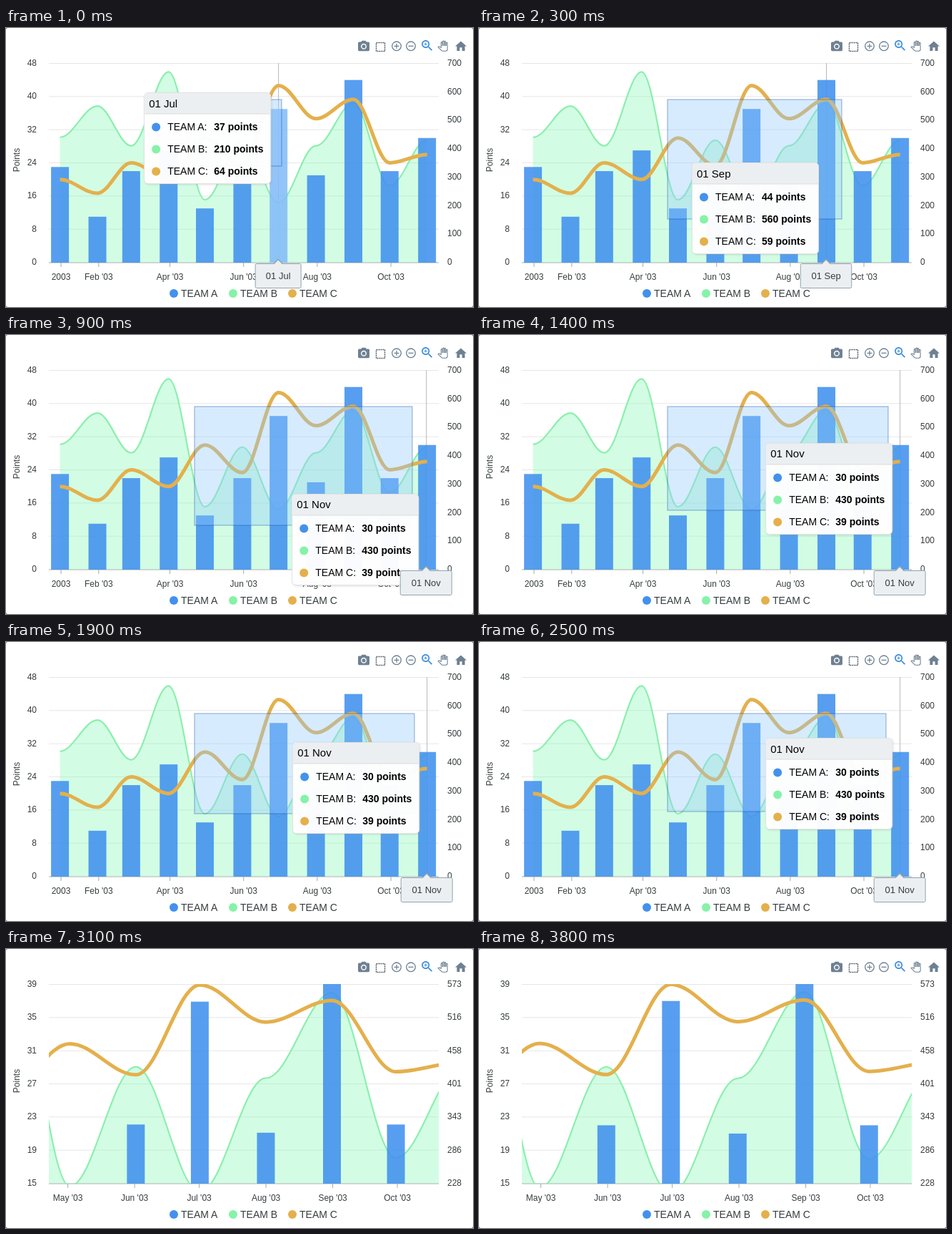
These frames come from a looping animation (654 px wide and 390 px high, 3.9 s). An HTML page:

```html
<!DOCTYPE html>
<html lang="en">
<head>
<meta charset="utf-8">
<style>
  html, body { margin: 0; width: 100%; height: 100%; overflow: hidden; background: #888; }
  svg { display: block; width: 654px; height: 390px; font: 12px "Liberation Sans", Arial, sans-serif; fill: #373d3f; }
  .mid { text-anchor: middle; }
  .end { text-anchor: end; }
  .big { font-size: 14px; }
  .tip { font-size: 14px; fill: #000; }
  .bold { font-weight: bold; }
  .icon { fill: #6e8192; }
</style>
</head>
<body>
<svg viewBox="0 0 654 390">
  <defs>
    <clipPath id="plot"><rect x="60" y="49" width="546" height="279.5"/></clipPath>
    <filter id="shadow" x="-10%" y="-10%" width="125%" height="125%">
      <feDropShadow dx="1" dy="1" stdDeviation="1.5" flood-color="#999" flood-opacity=".35"/>
    </filter>
  </defs>
  <rect width="654" height="390" rx="3" fill="#fff"/>
  <g id="grid" stroke="#e6e6e6"></g>
  <path d="M60 328H606" stroke="#a6a9aa"/>
  <g id="wide"></g>
  <g id="near"></g>
  <text class="mid" transform="translate(19 184.5) rotate(-90)">Points</text>
  <g id="legend" class="big"></g>

  <g class="icon">
    <g transform="translate(491.4 16.2) scale(.8)">
      <circle cx="12" cy="12" r="3.2"/>
      <path d="M9 2L7.17 4H4c-1.1 0-2 .9-2 2v12c0 1.1.9 2 2 2h16c1.1 0 2-.9 2-2V6c0-1.1-.9-2-2-2h-3.17L15 2H9zm3 15c-2.76 0-5-2.24-5-5s2.24-5 5-5 5 2.24 5 5-2.24 5-5 5z"/>
    </g>
    <rect x="518.5" y="20.5" width="12" height="12" fill="none" stroke="#555f69" stroke-width="1.5" stroke-dasharray="2 1"/>
    <g fill="none" stroke="#6e8192" stroke-width="1.3">
      <circle cx="547" cy="25.3" r="6.3"/><path d="M543.5 25.3h7M547 21.8v7"/>
      <circle cx="567" cy="25.3" r="6.3"/><path d="M563.5 25.3h7"/>
    </g>
    <g transform="translate(579.6 14.4) scale(.85)" fill="#3f8fdc">
      <path d="M15.5 14h-.79l-.28-.27C15.41 12.59 16 11.11 16 9.5 16 5.91 13.09 3 9.5 3S3 5.91 3 9.5 5.91 16 9.5 16c1.61 0 3.09-.59 4.23-1.57l.27.28v.79l5 4.99L20.49 19l-4.99-5zm-6 0C7.01 14 5 11.99 5 9.5S7.01 5 9.5 5 14 7.01 14 9.5 11.99 14 9.5 14z"/>
      <path d="M12 10h-2v2H9v-2H7V9h2V7h1v2h2v1z"/>
    </g>
    <path transform="translate(604.6 18) scale(.59)" fill="#fff" stroke="#6e8192" stroke-width="1.8"
      d="M23 5.5V20c0 2.2-1.8 4-4 4h-7.3c-1.08 0-2.1-.43-2.85-1.19L1 14.83s1.26-1.23 1.3-1.25c.22-.19.49-.29.79-.29.22 0 .42.06.6.16.04.01 4.31 2.46 4.31 2.46V4c0-.83.67-1.5 1.5-1.5S11 3.17 11 4v7h1V1.5c0-.83.67-1.5 1.5-1.5S15 .67 15 1.5V11h1V2.5c0-.83.67-1.5 1.5-1.5s1.5.67 1.5 1.5V11h1V5.5c0-.83.67-1.5 1.5-1.5s1.5.67 1.5 1.5z"/>
    <path transform="translate(627.4 16) scale(.8)" d="M10 20v-6h4v6h5v-8h3L12 3 2 12h3v8z"/>
  </g>

  <g clip-path="url(#plot)">
    <path id="cross" stroke="#b6b6b6"/>
    <path id="area" fill="#82f8b4" fill-opacity=".36"/>
    <path id="edge" fill="none" stroke="#8cefae" stroke-width="2.2"/>
    <g id="bars" fill-opacity=".88"></g>
    <path id="line" fill="none" stroke="#e4b04c" stroke-width="5"/>
  </g>

  <g id="overlay">
    <rect id="zone" fill="#90caf9" fill-opacity=".37" stroke="#0d47a1" stroke-opacity=".3" stroke-width="1.5"/>
    <g id="tip" class="tip">
      <rect x=".5" y=".5" width="177" height="127" rx="5" fill="#fff" fill-opacity=".96" stroke="#e3e3e3" filter="url(#shadow)"/>
      <path d="M1 30V5.5Q1 1 5.5 1H172.500Q177 1 177 5.500V30Z" fill="#eceff1"/>
      <path d="M1 30H177" stroke="#ddd"/>
      <text id="title" x="7" y="20.500" font-size="15"></text>
    </g>
    <g id="flag">
      <rect id="flagBox" y="329.500" height="34" rx="2" fill="#eceff1" stroke="#90a4ae"/>
      <path d="M-7 329.500L0 322.500L7 329.500" fill="#90a4ae"/>
      <path d="M-6 330.500L0 324.500L6 330.500" fill="#eceff1"/>
      <text id="flagText" class="mid" y="350.500" font-size="13"></text>
    </g>
  </g>
</svg>
<script>
const LOOP = 3900, ZOOM_AT = 2785, ZOOM_TIME = 350, BASE = 327.5, HEIGHT = 278;
const $ = id => document.getElementById(id);
const months = 'Jan Feb Mar Apr May Jun Jul Aug Sep Oct Nov'.split(' ');
const days = [0, 31, 59, 90, 120, 151, 181, 212, 243, 273, 304];
const teams = [
  { name: 'TEAM A', color: '#4391ec', data: [23, 11, 22, 27, 13, 22, 37, 21, 44, 22, 30], wide: [0, 48], near: [15, 39] },
  { name: 'TEAM B', color: '#86f2a8', data: [440, 550, 410, 670, 220, 430, 210, 410, 560, 270, 430], wide: [0, 700], near: [228, 573] },
  { name: 'TEAM C', color: '#e4b04c', data: [30, 25, 36, 30, 45, 35, 64, 52, 59, 36, 39], wide: [0, 72], near: [0, 64] }
];

const wideX = day => 75.6 + 1.691 * day;
const nearX = day => -277.1 + 3.016 * day;
const mix = (a, b, p) => a + (b - a) * p;
const wave = p => (1 - Math.cos(Math.PI * p)) / 2;
const clamp = p => Math.min(1, Math.max(0, p));
const text = (x, y, s, cls = '') => `<text x="${x}" y="${y}" class="${cls}">${s}</text>`;
const dot = (x, y, color) => `<circle cx="${x}" cy="${y}" r="6" fill="${color}"/>`;

// Static parts
for (let i = 0; i < 6; i++) {
  const y = 49.5 + i * HEIGHT / 6;
  $('grid').innerHTML += `<path d="M60 ${y}H606"/>`;
}
function axes(id, left, right, first, step, toX) {
  const column = (list, x, cls) =>
    list.map((v, i) => text(x, 53 + i * HEIGHT / (list.length - 1), v, cls)).join('');
  let out = column(left, 43, 'end') + column(right, 618);
  for (let i = first; i < 10; i += step) {
    const x = toX(days[i]) + 1.8;
    out += `<path d="M${x} 328v6" stroke="#a6a9aa"/>` + text(x, 352, months[i] + " '03", 'mid');
  }
  $(id).innerHTML += out;
}
axes('wide', [48, 40, 32, 24, 16, 8, 0], [700, 600, 500, 400, 300, 200, 100, 0], 1, 2, wideX);
$('wide').innerHTML += '<path d="M77 328v6" stroke="#a6a9aa"/>' + text(77, 352, 2003, 'mid');
axes('near', [39, 35, 31, 27, 23, 19, 15], [573, 516, 458, 401, 343, 286, 228], 4, 1, nearX);

teams.forEach((team, i) => {
  $('legend').innerHTML += dot(235 + 83 * i, 371, team.color) + text(245 + 83 * i, 376, team.name);
  const y = 48 + 31 * i;
  $('tip').innerHTML += dot(17, y + .5, team.color) + text(33, y + 5, team.name + ':') + text(98, y + 5, '', 'bold');
});
$('bars').innerHTML = '<rect width="25"/>'.repeat(months.length);
const bars = [...$('bars').children], values = [...document.querySelectorAll('.bold')];

// Pointer motion: time, x, y, tooltip top
const pointer = [
  [0, 386, 193, 90], [150, 462, 245, 142], [300, 508, 267, 188], [600, 538, 292, 216],
  [900, 569, 266, 222], [1400, 573, 245, 151], [1900, 572, 240, 140], [2500, 570, 237, 134]
];
// Start time and month of each hovered point
const hovers = [[-200, 6], [60, 7], [150, 8], [340, 9], [790, 10]];

function pointerAt(t) {
  let i = 0;
  while (i < pointer.length - 2 && t >= pointer[i + 1][0]) i++;
  const a = pointer[i], b = pointer[i + 1];
  const p = wave(clamp((t - a[0]) / (b[0] - a[0])));
  return a.map((v, k) => mix(v, b[k], p));
}

function pointsOf(team, p) {
  const y = (v, [lo, hi]) => BASE - (v - lo) / (hi - lo) * HEIGHT;
  return team.data.map((v, i) => [
    mix(wideX(days[i]), nearX(days[i]), p),
    mix(y(v, team.wide), y(v, team.near), p)
  ]);
}

function smooth(points) {
  return points.map(([x, y], i) => {
    if (!i) return `M${x} ${y}`;
    const [px, py] = points[i - 1], reach = (x - px) * .35;
    return `C${px + reach} ${py} ${x - reach} ${y} ${x} ${y}`;
  }).join('');
}

function set(id, attrs) {
  for (const key in attrs) $(id).setAttribute(key, attrs[key]);
}

function drawHover(t, x, y, top) {
  let n = 0;
  while (n < hovers.length - 1 && t >= hovers[n + 1][0]) n++;
  let cross = wideX(days[6]);
  for (const [start, month] of hovers.slice(0, n + 1))
    cross = mix(cross, wideX(days[month]), 1 - (1 - clamp((t - start) / 150)) ** 3);
  const month = hovers[n][1], label = '01 ' + months[month];
  set('cross', { d: `M${cross} 49V328` });
  set('zone', { x: 264, y: 100, width: x - 264, height: y - 100 });
  set('tip', { transform: `translate(${cross - 188.5} ${top})` });
  $('title').textContent = $('flagText').textContent = label;
  teams.forEach((team, i) => values[i].textContent = team.data[month] + ' points');
  const width = month === 6 ? 64 : month > 8 ? 72 : 71.5;
  set('flagBox', { x: -width / 2, width });
  set('flag', { transform: `translate(${cross - .5} 0)` });
}

function draw(now) {
  const t = now % LOOP, zoomed = t >= ZOOM_AT;
  const p = wave(clamp((t - ZOOM_AT) / ZOOM_TIME));
  const [, x, y, top] = pointerAt(t);
  const [a, b, c] = teams.map(team => pointsOf(team, p));

  $('wide').style.display = $('overlay').style.display = $('cross').style.display = zoomed ? 'none' : '';
  $('near').style.display = zoomed ? '' : 'none';

  a.forEach(([bx, by], i) => {
    const lit = !zoomed && Math.abs(x - bx) < 12.5 && y > by;
    bars[i].setAttribute('x', bx - 12.5);
    bars[i].setAttribute('y', by);
    bars[i].setAttribute('height', Math.max(0, BASE + .5 - by));
    bars[i].setAttribute('fill', lit ? '#84bcf9' : '#4191ee');
  });
  const curve = smooth(b);
  set('edge', { d: curve });
  set('area', { d: `${curve}V${BASE}H${b[0][0]}Z` });
  set('line', { d: smooth(c) });
  if (!zoomed) drawHover(t, x, y, top);
}

const begin = performance.now();
(function tick() {
  draw(performance.now() - begin);
  requestAnimationFrame(tick);
})();
</script>
</body>
</html>
```
